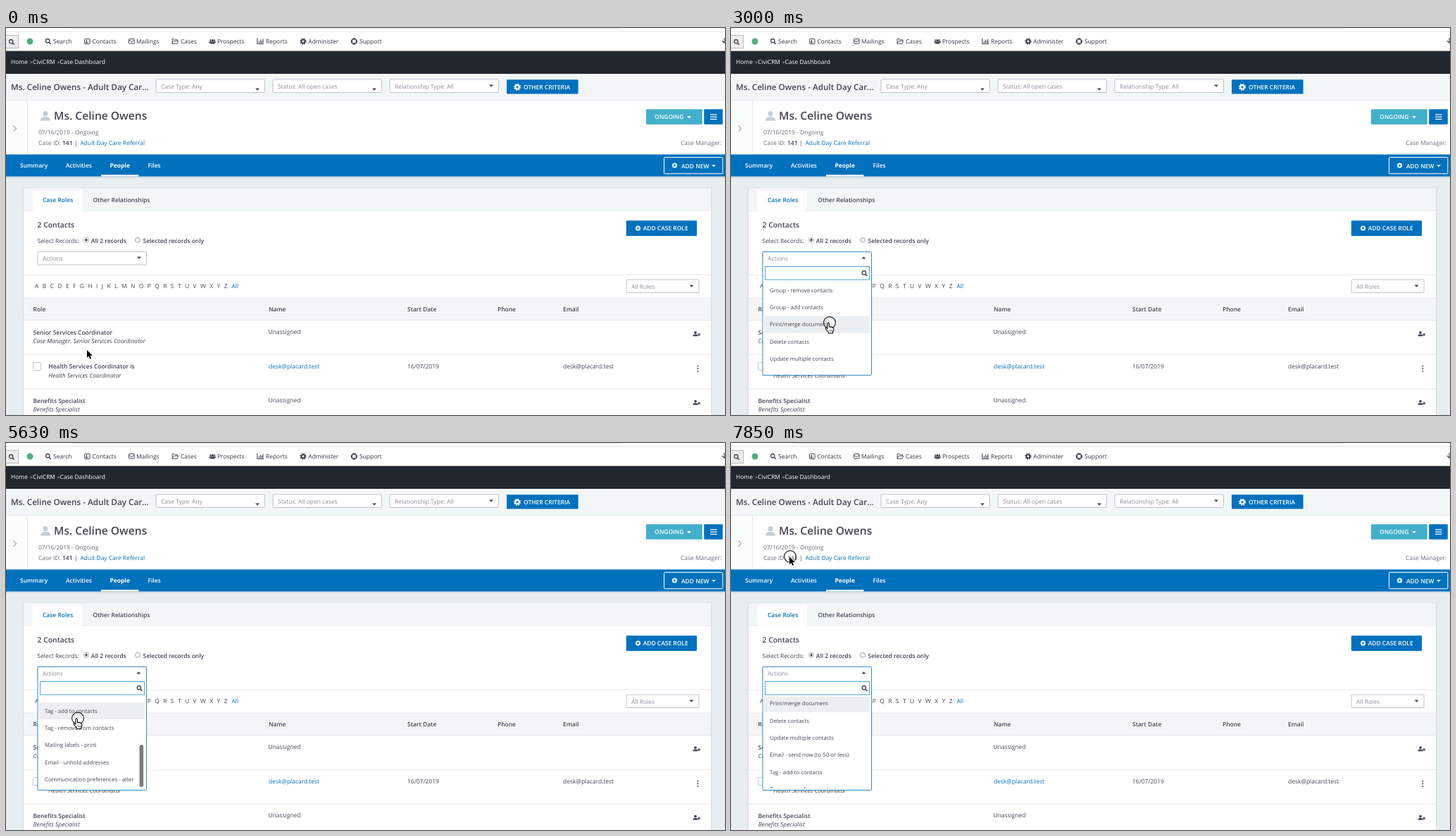
These frames come from a looping animation (1021 px wide and 549 px high, 8000 ms). An HTML page:

```html
<!DOCTYPE html>
<html lang="en">
<head>
<meta charset="utf-8">
<title>Case dashboard</title>
<style>
html, body { margin: 0; width: 100%; height: 100%; overflow: hidden; background: #fff; }
svg { display: block; width: 1021px; height: 549px; }
text { font-family: "Open Sans", "Noto Sans", sans-serif; white-space: pre; text-rendering: geometricPrecision; }
</style>
</head>
<body>
<svg id="stage" viewBox="0 0 1021 549" xmlns="http://www.w3.org/2000/svg"></svg>
<script>
const INK = '#464354', BLUE = '#0071bd', GREY = '#8d8c99', LINE = '#e3e9ec', PALE = '#f3f6f7', EDGE = '#bcc5cc';
const LOOP = 8000, ROW = 24.3, LIST_TOP = 359.5, LIST_H = 130.6;

// Drawing helpers, each returns SVG markup
const rect = (x, y, w, h, fill, extra = '') =>
  `<rect x="${x}" y="${y}" width="${w}" height="${h}" fill="${fill}" ${extra}/>`;
const path = (d, fill = 'none', extra = '') => `<path d="${d}" fill="${fill}" ${extra}/>`;
const circle = (x, y, r, fill, extra = '') => `<circle cx="${x}" cy="${y}" r="${r}" fill="${fill}" ${extra}/>`;
const stroke = (color, w = 1) => `stroke="${color}" stroke-width="${w}"`;
const text = (x, y, str, fill = INK, weight = 400, size = 8.45, extra = '') =>
  `<text x="${x}" y="${y}" fill="${fill}" font-weight="${weight}" font-size="${size}" ${extra}>${str}</text>`;
const bold = (x, y, str, fill = INK, size) => text(x, y, str, fill, 600, size);
const italic = (x, y, str) => text(x, y, str, INK, 400, 8.45, 'font-style="italic"');
const caret = (x, y, fill = INK, dir = 1) => path(`M${x - 3} ${y - 1.5 * dir}h6l-3 ${3.2 * dir}z`, fill);
const glass = (x, y, color = INK) =>
  circle(x - 0.8, y - 0.8, 2.7, 'none', stroke(color, 1.3)) +
  path(`M${x + 1.2} ${y + 1.2}l2.6 2.6`, 'none', stroke(color, 1.6));
const gear = (x, y, r, color, hole) =>
  circle(x, y, r * 0.78, color) +
  circle(x, y, r * 0.85, 'none', `${stroke(color, r * 0.4)} stroke-dasharray="${r * 0.334}"`) +
  circle(x, y, r * 0.33, hole);
const plusDisc = (x, y, disc, sign) =>
  circle(x, y, 3.5, disc) + path(`M${x - 2} ${y}h4M${x} ${y - 2}v4`, 'none', stroke(sign, 1.1));
const person = (x, y, s, color) =>
  `<g transform="translate(${x} ${y}) scale(${s})">` + circle(0, -3.4, 3.4, color) +
  path('M-6.5 6V4.4C-6.5 1.8-2.5.8 0 .8S6.5 1.8 6.5 4.4V6z', color) + '</g>';
const button = (x, y, w, h, fill = BLUE) => rect(x, y, w, h, fill, 'rx="1"');
const select = (x, y, w, label, caretY, base) =>
  rect(x + 0.5, y + 0.5, w - 1, 18.5, '#fff', `rx="1" ${stroke(EDGE)}`) +
  text(x + 7.5, base, label, GREY) + caret(x + w - 11, caretY);
const addPerson = y =>
  person(979, y, 0.56, INK) + path(`M982 ${y + 0.8}h4.2M984.1 ${y - 1.3}v4.2`, 'none', stroke(INK, 1.2));

function topNav() {
  const items = [[67, 'Search'], [122.5, 'Contacts'], [185, 'Mailings'], [248, 'Cases'], [300, 'Prospects'],
    [369, 'Reports'], [429.3, 'Administer'], [502, 'Support']];
  return rect(0, 0, 1021, 33, '#fff') +
    path('M88 -3q1 3 7 3.3h774q5-.3 7-3.3', 'none', stroke('#dcdee0')) +
    rect(0, 4.4, 1021, 1, '#e2e3e5') +
    rect(-3, 10.5, 20.5, 18, '#eeeeee', stroke('#b9b9b9')) + glass(8, 20) +
    circle(34, 19, 4.5, '#4fae82') +
    glass(60, 19) +
    rect(111.5, 15.5, 7.5, 7, 'none', `rx=".8" ${stroke(INK)}`) +
    path('M113 21v-1q1.3-1.2 2.6 0v1zM116.7 18h1M116.7 20h1', INK, stroke(INK, 0.6)) + circle(114.3, 18, 1, INK) +
    rect(174.5, 15.5, 7.6, 6.6, 'none', `rx=".8" ${stroke(INK)}`) + path('M174.5 17l3.8 2.8 3.8-2.8', 'none', stroke(INK)) +
    path('M236 22.3v-6.8h3l1 1.2h3.5v1.6M236 22.3l1.8-4h7l-1.8 4z', 'none', stroke(INK, 0.9)) +
    person(290.4, 18.6, 0.36, INK) + person(296, 18.6, 0.36, INK) + person(293.2, 19.4, 0.5, INK) +
    path('M356.8 14.5v8h9.5M359.3 21.5v-2.5M361.3 21.5v-5M363.3 21.5v-3.5M365 21.5v-6', 'none', stroke(INK, 1.1)) +
    gear(422, 19, 4.5, INK, '#fff') +
    circle(494.3, 19, 3.4, 'none', stroke(INK, 2)) +
    path('M490.9 15.6l2 2M497.7 15.6l-2 2M490.9 22.4l2-2M497.7 22.4l-2-2', 'none', stroke('#fff', 0.8)) +
    circle(494.3, 19, 4.2, 'none', stroke(INK, 0.7)) +
    path('M1020 14v7M1016.8 18l3.2 3.2 3.2-3.2', 'none', stroke(INK, 1.1)) +
    items.map(([x, s]) => text(x, 22, s, '#34323f')).join('');
}

function header() {
  return rect(0, 32.6, 1021, 32.5, '#21262f') +
    text(7, 51, 'Home', '#fff') + text(34, 50.5, '&gt;', '#fff', 400, 6.5) + text(38, 51, 'CiviCRM', '#fff') +
    text(72.8, 50.5, '&gt;', '#fff', 400, 6.5) + text(76.5, 51, 'Case Dashboard', '#fff') +
    rect(0, 65, 1021, 38, PALE) + rect(0, 102, 1021, 1, LINE) +
    bold(7, 88, 'Ms. Celine Owens - Adult Day Car...', INK, 11.7) +
    select(212.5, 72.5, 155.5, 'Case Type: Any', 87, 85.5) +
    select(378.5, 72.5, 155.5, 'Status: All open cases', 87, 85.5) +
    select(544.5, 72.5, 155.5, 'Relationship Type: All', 82, 86) +
    button(711, 73.2, 101.6, 20.2) + gear(726, 83.8, 4.8, '#fff', BLUE) + bold(735, 86.8, 'OTHER CRITERIA', '#fff') +
    rect(0, 103, 1021, 76, '#fff') + rect(0, 103, 30, 76, '#fbfcfc') + rect(30, 103, 1, 76, LINE) +
    path('M10.5 138.5l4 4.2-4 4.2', 'none', stroke('#a5adb4', 1.2)) +
    person(56, 125.2, 1.05, '#c2cfd8') +
    bold(68, 130, 'Ms. Celine Owens', INK, 15.6) +
    text(46, 151, '07/16/2019 - Ongoing', '#6c6a78') +
    text(46, 166, 'Case ID:', '#6c6a78') + bold(80, 166, '141') + text(97, 166, '|') +
    text(105.5, 166, 'Adult Day Care Referral', BLUE) +
    button(909, 115.2, 79.8, 21.6, '#42afcb') + bold(921, 129, 'ONGOING', '#fff') + caret(970, 126.5, '#fff') +
    button(991.2, 115.2, 26.6, 21.6) +
    path('M1000 122.9h9.6M1000 126.1h9.6M1000 129.3h9.6', 'none', stroke('#fff', 1.3)) +
    text(958, 166, 'Case Manager:', '#6c6a78');
}

function tabs() {
  return rect(0, 210, 1021, 339, '#e8eef0') +
    '<linearGradient id="fade" x2="0" y2="1"><stop stop-color="#cfd8dc"/><stop offset="1" stop-color="#e8eef0"/></linearGradient>' +
    rect(0, 210.6, 1021, 4, 'url(#fade)') +
    rect(0, 179.4, 1021, 31.2, BLUE) + rect(135, 208.2, 53.5, 2.4, '#fff') +
    bold(20, 198, 'Summary', '#fff') + bold(85, 198, 'Activities', '#fff') +
    text(147.5, 198, 'People', '#fff', 700) + bold(201.5, 198, 'Files', '#fff') +
    rect(934.5, 183.5, 83.3, 23.2, 'none', `rx="1" ${stroke('#fff')}`) +
    plusDisc(949.5, 195, '#fff', BLUE) + bold(959, 198.5, 'ADD NEW', '#fff') + caret(1005, 195.5, '#fff');
}

function card() {
  const letters = [...'ABCDEFGHIJKLMNOPQRSTUVWXYZ'].join(' ');
  const heads = [[38.5, 'Role'], [373, 'Name'], [570, 'Start Date'], [698, 'Phone'], [791, 'Email']];
  return rect(23, 226, 980, 330, '#000', 'opacity=".025"') + rect(24, 226.5, 978, 330, '#000', 'opacity=".035"') +
    rect(25, 227, 976, 330, '#fff') +
    rect(25, 227, 976, 32, PALE) + rect(25, 258.5, 976, 1, LINE) +
    rect(38, 230.5, 70, 29, '#fff', 'rx="1"') +
    bold(52, 247.3, 'Case Roles', BLUE) + bold(123.5, 247.3, 'Other Relationships') +
    bold(44.5, 282.5, '2 Contacts', INK, 10.4) +
    text(44.5, 304.5, 'Select Records:') +
    circle(114, 300.8, 3.5, '#fff', stroke('#9a9a9a', 0.9)) + circle(114, 300.8, 1.7, '#444') +
    bold(120.8, 304.5, 'All 2 records') +
    circle(187, 300.8, 3.5, '#f4f4f4', stroke('#9a9a9a', 0.9)) + bold(194.5, 304.5, 'Selected records only') +
    button(880.8, 273.3, 100.2, 21.6) + plusDisc(897.5, 284, '#fff', BLUE) + bold(904.7, 287, 'ADD CASE ROLE', '#fff') +
    select(44.5, 317, 155.5, 'Actions', 326, 330) +
    rect(25, 349.5, 976, 1, LINE) +
    text(41, 369, letters, INK, 400, 8.45, 'word-spacing="3.23"') + text(320.5, 369, 'All', BLUE) +
    select(880.5, 356.5, 104, 'All Roles', 366, 369.5) +
    rect(25, 383, 976, 31, PALE) + rect(25, 382.5, 976, 1, LINE) +
    heads.map(([x, s]) => bold(x, 401.5, s)).join('') +
    [414, 462.7, 511.4].map(y => rect(25, y, 976, 1, LINE)).join('') +
    bold(38.5, 434.7, 'Senior Services Coordinator') + italic(38.5, 447, 'Case Manager. Senior Services Coordinator') +
    text(372.5, 434, 'Unassigned') + addPerson(434) +
    rect(38.5, 474.5, 11, 11, '#fff', `rx="1" ${stroke(EDGE)}`) +
    bold(60.3, 483.3, 'Health Services Coordinator is') + italic(60.3, 495.5, 'Health Services Coordinator') +
    text(373, 482.7, 'desk@placard.test', BLUE) + text(570, 482.7, '16/07/2019') + text(791, 482.7, 'desk@placard.test') +
    [479.7, 483.3, 486.9].map(y => circle(982.3, y, 1, INK)).join('') +
    bold(38.5, 532, 'Benefits Specialist') + italic(38.5, 544.3, 'Benefits Specialist') +
    text(372.5, 531.3, 'Unassigned') + addPerson(531.5);
}

function menu() {
  const items = ['Group - remove contacts', 'Group - add contacts', 'Print/merge document', 'Delete contacts',
    'Update multiple contacts', 'Email - send now (to 50 or less)', 'Tag - add to contacts', 'Tag - remove from contacts',
    'Mailing labels - print', 'Email - unhold addresses', 'Communication preferences - alter'];
  return `<clipPath id="view">${rect(45, LIST_TOP, 154, LIST_H, '#000')}</clipPath><g id="menu">` +
    rect(44, 318, 157, 176.5, '#000', 'opacity=".04" rx="2"') +
    rect(45, 317.5, 154.5, 175, '#fff', `rx="1" ${stroke('#3a8cc9')}`) +
    text(52, 330, 'Actions', GREY) + caret(188.5, 326, INK, -1) +
    rect(48.5, 338.5, 148, 18.5, '#fff', stroke('#4f9fd8')) + glass(189.7, 348) +
    `<g clip-path="url(#view)"><g id="list">` + rect(45.5, 0, 151.5, ROW, '#eceff1', 'id="mark"') +
    items.map((s, i) => text(55, 374.8 + i * ROW, s, INK, 400, 7.8)).join('') +
    `</g></g>` + rect(189.5, 0, 5.6, 60, '#7d7d7d', 'id="thumb" rx="2.8"') + `</g>`;
}

function pointer() {
  const line = 'stroke-linejoin="round" stroke-linecap="round" ';
  return `<g id="pointer">` +
    circle(0, 0, 8.4, '#fff', `id="ring" fill-opacity=".3" ${stroke('#111', 1.1)}`) +
    path('M-1 .5v10.8l2.5-2.3 1.7 3.9 1.9-.8-1.7-3.8h3.4z', '#000', `id="arrow" ${line}${stroke('#fff', 0.8)} paint-order="stroke"`) +
    `<g id="hand"><g transform="translate(-.6 1.2) scale(1.05)">` +
    path('M-2.4 7V.6q0-1.5 1.2-1.5T0 .6v4q1-.8 2.1.3 1.2-.6 2.1.6 1.9-.2 1.9 1.5 0 3-1.3 4.6v1.6h-5.6v-1.3q-2.4-2.2-4-4.9-.5-1.3.6-1.5 1 0 1.8 1.5z',
      '#fff', line + stroke('#000', 1)) +
    path('M.9 8.6v2.2M2.6 8.6v2.2M4.2 8.6v2.2', 'none', stroke('#000', 0.6)) + `</g></g></g>`;
}

// Runs of visible change: start, end, number of steps
const RUNS = [[150, 900, 6], [1610, 1750, 2], [2340, 3000, 5], [3300, 3800, 4], [4100, 5030, 7],
  [5180, 5780, 5], [6080, 6080, 1], [6260, 7010, 6], [7160, 7850, 5]];
const MOVE = [[0, 116, 456.5], [150, 113, 461], [300, 98, 440], [450, 95, 400], [600, 108, 358], [750, 130, 326],
  [900, 134.5, 329.5], [1610, 165, 324.5], [1750, 197, 326], [2340, 197, 326], [2670, 172, 372], [3000, 140, 418],
  [4100, 140, 418], [4565, 122, 431], [4875, 103, 420], [5030, 98, 400], [5480, 100, 392], [5780, 104, 389],
  [6260, 104, 389], [6560, 104, 376], [6710, 103, 358], [6860, 100, 290], [7010, 95, 221],
  [7332, 82, 99], [7505, 79, 112], [7850, 84, 161]];
const SCROLL = [[0, 0], [3000, 0], [3300, 28], [3800, 132], [4100, 135], [4255, 137.8], [5780, 137.8],
  [6080, 104], [6260, 55.9], [6410, 51]];
const MARK = [[0, 0], [2835, 1], [3000, 2], [4410, 7], [4565, 8], [5180, 7], [5480, 6], [6560, 3], [6710, 2]];

function stepTime(t) {
  let last = 0;
  for (const [a, b, n] of RUNS) {
    if (t < a) break;
    const gap = n > 1 ? (b - a) / (n - 1) : 1;
    last = a + gap * Math.min(n - 1, Math.floor((t - a) / gap + 1e-6));
  }
  return last;
}

function along(keys, t) {
  const i = keys.findIndex(k => k[0] > t);
  if (i < 0) return keys[keys.length - 1].slice(1);
  const a = keys[i - 1], b = keys[i], f = (t - a[0]) / (b[0] - a[0]);
  return a.slice(1).map((v, j) => v + (b[j + 1] - v) * f);
}

const held = (keys, t) => keys.filter(k => k[0] <= t + 0.01).pop()[1];

const stage = document.getElementById('stage');
stage.innerHTML = topNav() + header() + tabs() + card() + menu() + pointer();
const el = {};
for (const id of ['menu', 'list', 'mark', 'thumb', 'pointer', 'ring', 'arrow', 'hand']) el[id] = document.getElementById(id);
const show = (node, on) => node.setAttribute('display', on ? 'inline' : 'none');

function draw(t) {
  const s = stepTime(t);
  const [x, y] = along(MOVE, s);
  const [scroll] = along(SCROLL, s);
  const open = s >= 2340;
  const onList = open && y > LIST_TOP && y < LIST_TOP + LIST_H;
  show(el.menu, open);
  el.list.setAttribute('transform', `translate(0 ${-scroll})`);
  el.mark.setAttribute('y', 359.9 + held(MARK, s) * ROW);
  el.thumb.setAttribute('y', 360.7 + scroll * 0.488);
  show(el.thumb, s >= 3300 && s < 7400);
  el.pointer.setAttribute('transform', `translate(${x} ${y})`);
  show(el.ring, t >= 1190);
  show(el.arrow, !onList);
  show(el.hand, onList);
}

const begin = performance.now();
function tick() {
  draw((performance.now() - begin) % LOOP);
  requestAnimationFrame(tick);
}
tick();
</script>
</body>
</html>
```
